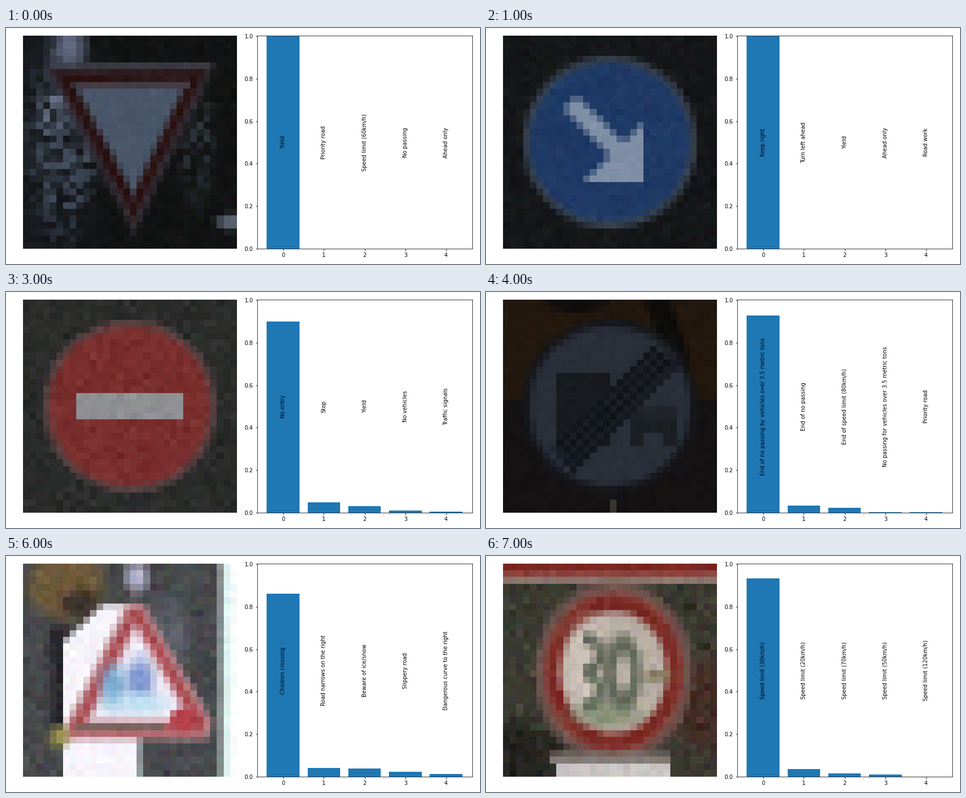
Animation, 864 px wide and 432 px high, one loop 8 s. Source, as a matplotlib script:

```python
import numpy as np
import matplotlib.pyplot as plt
from matplotlib.animation import FuncAnimation
from matplotlib.colors import to_rgb

W, H, N = 864, 432, 32
ROW, COL = np.mgrid[0:N, 0:N]
X, Y = COL + 0.5, ROW + 0.5


# Depth fields: distance in cells to the outline, positive inside.
def ellipse(cx, cy, rx, ry):
    return (1 - np.hypot((X - cx) / rx, (Y - cy) / ry)) * min(rx, ry)


def convex(*pts):
    """Convex polygon, corners clockwise on screen."""
    edges = []
    for (x1, y1), (x2, y2) in zip(pts, pts[1:] + pts[:1]):
        dx, dy = x2 - x1, y2 - y1
        edges.append((dx * (Y - y1) - dy * (X - x1)) / np.hypot(dx, dy))
    return np.min(edges, axis=0)


def box(x, y, w, h):
    return convex((x, y), (x + w, y), (x + w, y + h), (x, y + h))


def cover(depth, soft=1.0):
    return np.clip(depth / soft + 0.5, 0, 1)


def ramp(v, lo, hi):
    return np.clip((v - lo) / (hi - lo), 0, 1)


class Photo:
    def __init__(self, base, seed):
        self.px = np.ones((N, N, 3)) * to_rgb(base)
        self.rng = np.random.default_rng(seed)

    def tint(self, mask, color):
        a = mask[..., None]
        self.px = self.px * (1 - a) + a * np.array(to_rgb(color))

    def fill(self, depth, color, soft=1.0):
        self.tint(cover(depth, soft), color)

    def rings(self, depth, insets, colors):
        """Nested outlines, each further inside the shape."""
        for inset, color in zip(insets, colors):
            self.fill(depth - inset, color, 1.2)

    def speckle(self, depth, color):
        self.tint(cover(depth, 3) * self.rng.random((N, N)) ** 1.5, color)

    def car(self, x, y, w, roof, body, wheel):
        self.fill(box(x, y - 2, w, 2), roof)
        self.fill(box(x, y, w, 2), body)
        for side in (x, x + w - 2):
            self.fill(box(side, y + 2, 2, 2), wheel)

    def grain(self, grey, hue):
        self.px += self.rng.normal(0, grey, (N, N, 1)) + self.rng.normal(0, hue, (N, N, 3))

    def done(self, grey=0.008, hue=0.005):
        self.grain(grey, hue)
        return np.clip(self.px, 0, 1)


def yield_sign():
    p = Photo("#121313", 1)
    p.tint(ramp(-X, -14, 0) * 0.5, "#1c2128")
    p.speckle(ellipse(6, 15, 5, 14), "#485468")
    p.speckle(ellipse(5, 11, 2, 4), "#8494ae")
    p.fill(ellipse(7, 1.5, 2, 3), "#646d85", 3)
    p.speckle(ellipse(26, 16, 2, 7), "#3c4850")
    p.fill(ellipse(31, 28, 2, 1.2), "#565f6c")
    p.rings(convex((3.2, 4.6), (28.8, 4.2), (16.6, 29.6)), (0, 1, 2.6),
            ("#352f38", "#29100f", "#4a576a"))
    p.tint(cover(box(8, 4, 20, 1)), "#3a3941")
    p.tint(cover(box(8, 7, 17, 1)), "#453c46")
    return p.done(0.006)


def keep_right():
    p = Photo("#151719", 2)
    p.rings(ellipse(16, 16, 13, 13), (0, 1), ("#39434f", "#1f3a66"))
    p.fill(convex((9, 11), (11, 9), (20, 18), (18, 20)), "#7f8fa6")
    p.fill(convex((21, 13), (21, 22), (12, 22)), "#7f8fa6")
    return p.done()


def no_passing():
    p = Photo("#0e0d0f", 3)
    disc = ellipse(17, 15.9, 13.6, 14)
    p.fill(disc, "#2b3039", 1.6)
    p.tint(cover(disc) * ramp(X, 18, 28), "#5b3f35")
    p.fill(disc - 1.3, "#692829", 1.4)
    p.tint(cover(disc - 1.6) * ramp(X - Y, 2, 22), "#96443f")
    p.tint(cover(disc - 1.6) * ramp(Y, 20, 30) * 0.8, "#5c2022")
    p.fill(disc - 4.5, "#89919f", 1.3)
    p.tint(cover(disc - 5) * ramp(-X, -16, -8), "#a0a4b8")
    p.tint(cover(disc - 5) * ramp(X + Y, 36, 46), "#7d848d")
    p.car(9, 15, 7, "#85797f", "#79302f", "#85686f")
    p.car(18, 15, 7, "#777880", "#303237", "#4a5558")
    p.fill(box(4, 30, 28, 2), "#545459")
    p.tint(cover(box(21, 30, 8, 2)) * ramp(X, 17, 28), "#a49eb2")
    return p.done(0.012, 0.008)


def no_entry():
    p = Photo("#2b2c2b", 4)
    p.rings(ellipse(16, 16, 13, 13), (0, 1), ("#5b4444", "#7a2f2d"))
    p.fill(box(8, 14, 16, 4), "#8f9093")
    return p.done(0.015)


def end_sign():
    p = Photo("#23180e", 5)
    p.fill(box(-2, 15, 36, 20), "#151213")
    p.fill(ellipse(11, 0, 4.5, 2), "#100d0d")
    p.fill(convex((21, 0), (25, 0), (28, 9), (27, 14)), "#0e0c0c")
    p.rings(ellipse(16, 16, 13.2, 13.2), (0, 1.2), ("#15171b", "#2a2f39"))
    p.fill(box(8, 11, 8, 11), "#181b1f")
    p.car(19, 18, 7, "#20242b", "#1b1f23", "#1d2025")
    band = cover(convex((7.5, 22), (22.5, 7), (26.5, 9.5), (10.5, 26)))
    p.tint(band, "#1a1e25")
    p.tint(band * ((ROW + COL) % 2), "#12141a")
    p.fill(box(16, 30, 1, 3), "#38382f")
    return p.done(0.004, 0.003)


def caution():
    p = Photo("#39322f", 6)
    p.grain(0.016, 0.006)
    p.fill(ellipse(30, 2, 1.5, 1.5), "#644731", 2)
    p.fill(box(23, 6, 2, 8), "#272422")
    sign = convex((16.5, 2.5), (28.8, 27.2), (4.2, 27.2))
    p.rings(sign, (0, 1.1, 2.9), ("#94646a", "#8d322f", "#aea79b"))
    p.tint(cover(sign - 3.2) * ramp(-X, -16, -13) * 0.7, "#c8c0b5")
    p.fill(box(15, 12, 3, 7), "#75807d")
    p.fill(convex((16, 12), (17, 12), (17.5, 18), (24, 20), (25, 24), (18, 23)), "#262b2f")
    p.fill(ellipse(20.5, 22.2, 2, 0.7), "#6f7371")
    p.fill(box(22, 24, 4, 2), "#5f1f22")
    p.fill(box(11, 24, 11, 1), "#76676a")
    p.fill(box(11, 25, 11, 8), "#a5aaac")
    for y in (27, 29):
        p.fill(box(13, y, 7, 1), "#7a7e82")
    return p.done(0.012, 0.01)


def children():
    p = Photo("#484a4c", 7)
    p.fill(ellipse(6.5, 3, 5.5, 5.5), "#705c3c", 3)
    p.fill(ellipse(8.5, 6, 2.5, 2), "#3a302b", 2)
    p.fill(box(4, 9, 2.5, 17), "#29292d", 2)
    p.fill(ellipse(22, 10, 3, 5), "#5b5e66", 3)
    p.fill(ellipse(17, 2, 1.5, 2), "#b8b8d2", 2)
    p.grain(0.015, 0.008)
    p.fill(convex((12, 6.2), (17, 6.2), (17, 32), (6, 32), (6, 11.8)), "#f7f4fb")
    p.fill(box(17, 26, 1, 7), "#8b9299")
    sign = convex((15.5, 6), (18, 6), (28.4, 23.8), (27.5, 26.4), (6, 26.4), (6, 25))
    p.rings(sign, (0, 0.9, 2.3, 3), ("#bd8c93", "#a84a4d", "#cf9aa6", "#eeecf7"))
    p.fill(ellipse(13.5, 18.5, 1.8, 3), "#78a8ce", 2)
    p.fill(ellipse(17.5, 17.5, 1.8, 3), "#7892cc", 2)
    p.fill(ellipse(17, 21, 4, 1.5), "#bfe0f2", 2)
    p.fill(box(8, 24, 13, 1), "#7b625e")
    p.fill(ellipse(24, 23.5, 2, 1.8), "#b5434b")
    p.fill(ellipse(5.5, 26, 1.5, 1.5), "#98914f", 2)
    for x, color in ((29, "#858f8f"), (30, "#dff4f3"), (31, "#fafdfd")):
        p.fill(box(x, -1, 1, 34), color)
    return p.done(0.012, 0.01)


def limit_30():
    p = Photo("#3b3a31", 8)
    p.fill(ellipse(31, 21, 5, 7), "#432d25", 3)
    p.fill(ellipse(2, 29, 6, 5), "#25241f", 3)
    p.grain(0.018, 0.006)
    for y, color in enumerate(("#7b2620", "#8d433e", "#8b756e")):
        p.fill(box(-1, y, 34, 1), color)
    p.rings(ellipse(16.6, 16.3, 11.8, 13.6), (0, 1.4, 2.1, 3.9),
            ("#70544e", "#8a3e37", "#7b2a24", "#b8aea4"))
    p.fill(ellipse(12.5, 15.5, 3, 6), "#cdc2b8", 3)
    p.fill(ellipse(15.5, 22.5, 4.5, 2), "#8a9478", 2)
    p.fill(box(15, 11.5, 1, 10), "#8a877f")
    for cx, cy, rx, ry in ((12.5, 13.7, 2.6, 3.2), (12.5, 19, 2.6, 3.2), (18, 16.4, 2.6, 5.7)):
        bowl = ellipse(cx, cy, rx, ry)
        p.tint(cover(bowl) * cover(1.4 - bowl) * (X > (12 if cx < 15 else 0)), "#626a5b")
    p.fill(ellipse(23, 16.8, 2, 0.8), "#857b5c")
    p.fill(box(7, 28.5, 18, 1.5), "#837b77")
    p.fill(box(8, 30, 17, 3), "#cac4c3")
    return p.done(0.014, 0.01)


SPEED = "Speed limit ({}km/h)".format
HEAVY = "o passing for vehicles over 3.5 metric tons"

SLIDES = [
    (yield_sign(), [1, 0, 0, 0, 0],
     ["Yield", "Priority road", SPEED(60), "No passing", "Ahead only"]),
    (keep_right(), [1, 0, 0, 0, 0],
     ["Keep right", "Turn left ahead", "Yield", "Ahead only", "Road work"]),
    (no_passing(), [0.995, 0.004, 0, 0, 0],
     ["No passing", "N" + HEAVY, "Dangerous curve to the left", "Slippery road", SPEED(60)]),
    (no_entry(), [0.9, 0.05, 0.03, 0.01, 0.004],
     ["No entry", "Stop", "Yield", "No vehicles", "Traffic signals"]),
    (end_sign(), [0.929, 0.033, 0.023, 0.003, 0.002],
     ["End of no passing by vehicles over 3.5 metric tons", "End of no passing",
      "End of speed limit (80km/h)", "N" + HEAVY, "Priority road"]),
    (caution(), [0.444, 0.231, 0.103, 0.080, 0.077],
     ["General caution", "Traffic signals", SPEED(70), SPEED(30), "Wild animals crossing"]),
    (children(), [0.860, 0.041, 0.038, 0.023, 0.012],
     ["Children crossing", "Road narrows on the right", "Beware of ice/snow",
      "Slippery road", "Dangerous curve to the right"]),
    (limit_30(), [0.934, 0.036, 0.015, 0.010, 0],
     [SPEED(30), SPEED(20), SPEED(70), SPEED(50), SPEED(120)]),
]

plt.rcParams.update({"font.family": "DejaVu Sans", "font.size": 10})
fig = plt.figure(figsize=(W / 72, H / 72), dpi=72, facecolor="white")

photo_ax = fig.add_axes([31 / W, 28 / H, 390 / W, 390 / H])
photo_ax.axis("off")
photo = photo_ax.imshow(SLIDES[0][0], interpolation="nearest", aspect="auto")

bar_ax = fig.add_axes([457.52 / W, 28 / H, 392.2 / W, 389.6 / H])
bars = bar_ax.bar(range(5), SLIDES[0][1], width=0.8, color="#1f77b4")
bar_ax.set(xlim=(-0.64, 4.64), ylim=(0, 1.0015), xticks=range(5))
labels = [bar_ax.text(i, 0.5, "", rotation=90, ha="center", va="center") for i in range(5)]


def draw(i):
    pixels, heights, names = SLIDES[i]
    photo.set_data(pixels)
    for rect, label, h, name in zip(bars, labels, heights, names):
        rect.set_height(h)
        label.set_text(name)
    return [photo, *bars, *labels]


anim = FuncAnimation(fig, draw, frames=len(SLIDES), interval=1000, repeat=True)
plt.show()
```
